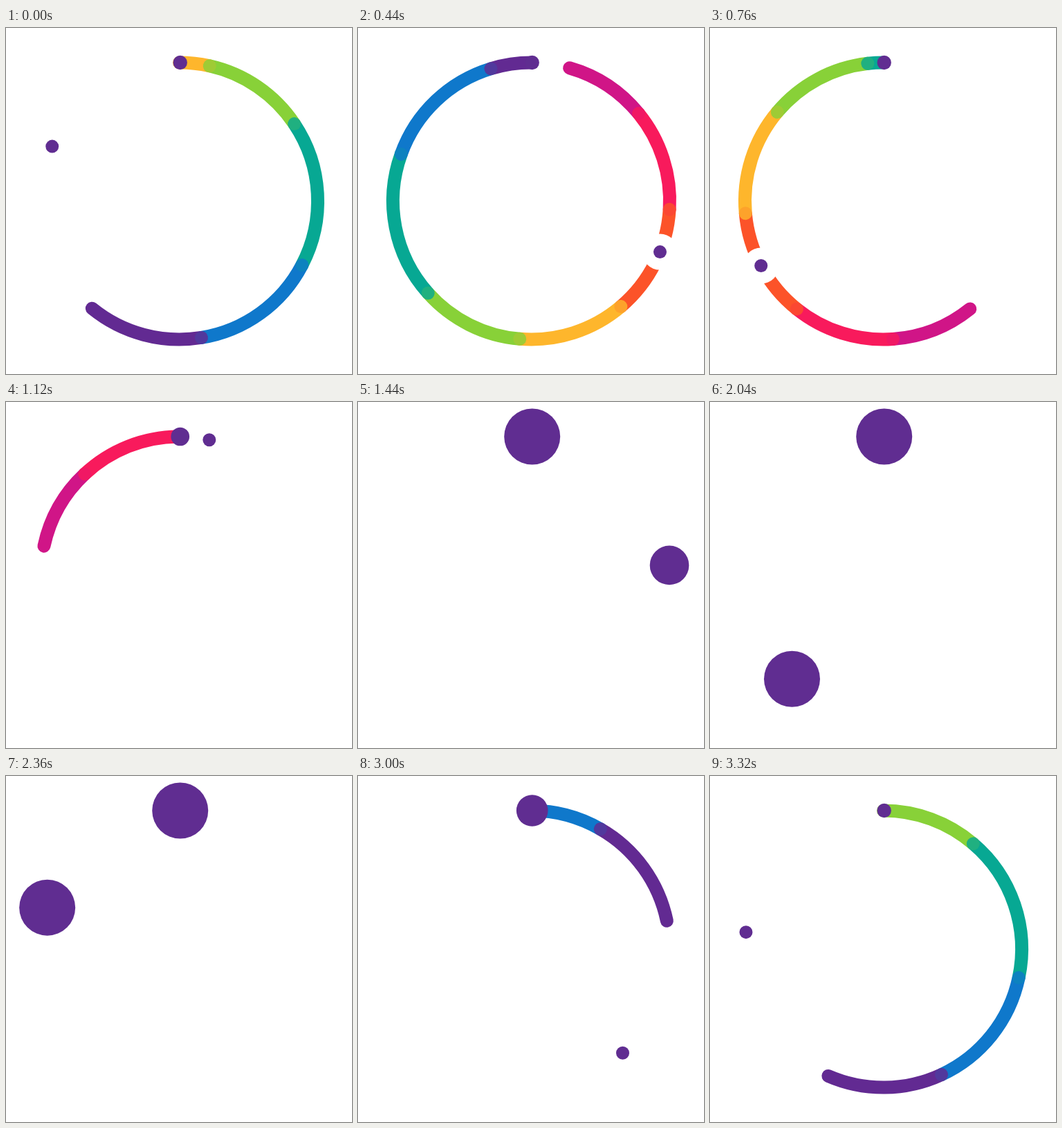
These frames come from a looping animation (500 by 500 pixels, 3360 ms). An HTML page with a canvas:

```html
<!DOCTYPE html>
<html>
<head>
<meta charset="utf-8">
<style>
html, body { margin: 0; height: 100%; overflow: hidden; background: #fff; }
canvas { display: block; }
</style>
</head>
<body>
<canvas id="stage" width="500" height="500"></canvas>
<script>
const ctx = document.getElementById('stage').getContext('2d');
const LOOP = 3360, PHASE = 560, CX = 250.5, CY = 250, R = 200;
const PURPLE = '#602d91', SPEED = 0.3913;
const colors = ['#622a92', '#0f78cb', '#07a893', '#88d138', '#feb62c', '#fc5329', '#f81a5c', '#d01587'];
// Degrees behind the head where each colour starts; the last is the tail
const joints = [0, 48.3, 101.5, 163, 206.5, 251.6, 297.8, 340.5, 375.3];
// Orbiting dot: time, angle, speed
const orbit = [
  [0, 0, .95], [200, 138.7, .5], [520, 277, .405], [1000, 471.6, .395], [1600, 711, .36],
  [1700, 737, .23], [2280, 869.6, .225], [2920, 1007.4, .19], [3360, 1080, .1]
];

const smooth = (t, a, b) => {
  const s = Math.min(1, Math.max(0, (t - a) / (b - a)));
  return s * s * (3 - 2 * s);
};
const rad = deg => (deg - 90) * Math.PI / 180;
const clamp = deg => Math.min(360, Math.max(0, deg));

function orbitAngle(t) {
  const i = orbit.findIndex(k => k[0] > t);
  const [t0, a0, v0] = orbit[i - 1], [t1, a1, v1] = orbit[i];
  const h = t1 - t0, s = (t - t0) / h, s2 = s * s, s3 = s2 * s;
  return a0 + (a1 - a0) * (3 * s2 - 2 * s3) + h * (v0 * (s3 - 2 * s2 + s) + v1 * (s3 - s2));
}

function disc(x, y, r, color) {
  ctx.fillStyle = color;
  ctx.beginPath();
  ctx.arc(x, y, r, 0, 7);
  ctx.fill();
}

function ringDisc(deg, r, color) {
  disc(CX + R * Math.cos(rad(deg)), CY + R * Math.sin(rad(deg)), r, color);
}

function drawRing(head) {
  ctx.lineWidth = 19;
  ctx.lineCap = 'round';
  for (let i = colors.length - 1; i >= 0; i--) {
    const start = head - joints[i + 1], from = clamp(start), to = clamp(head - joints[i]);
    if (to <= from) continue;
    ctx.strokeStyle = colors[i];
    ctx.beginPath();
    ctx.arc(CX, CY, R, rad(from), rad(to));
    ctx.stroke();
    // Blend the overlapping caps
    if (start > 0 && colors[i + 1]) {
      ctx.globalAlpha = .2;
      ringDisc(start, 9.5, colors[i + 1]);
      ctx.globalAlpha = 1;
    }
  }
}

function draw(now) {
  const t = (now + PHASE) % LOOP;
  ctx.fillStyle = '#fff';
  ctx.fillRect(0, 0, 500, 500);
  drawRing(t * SPEED);
  const angle = orbitAngle(t), r = 9.5 + 31 * smooth(t, 1680, 2240);
  ringDisc(angle, Math.max(26, r), '#fff');
  ringDisc(angle, r, PURPLE);
  const size = 1 - smooth(t, 0, 360) + smooth(t, 1600, 2000);
  disc(251.7, 50, 10.2 + 30.3 * size, PURPLE);
}

let begin;
function frame(now) {
  begin ??= now;
  draw(now - begin);
  requestAnimationFrame(frame);
}
draw(0);
requestAnimationFrame(frame);
</script>
</body>
</html>
```
